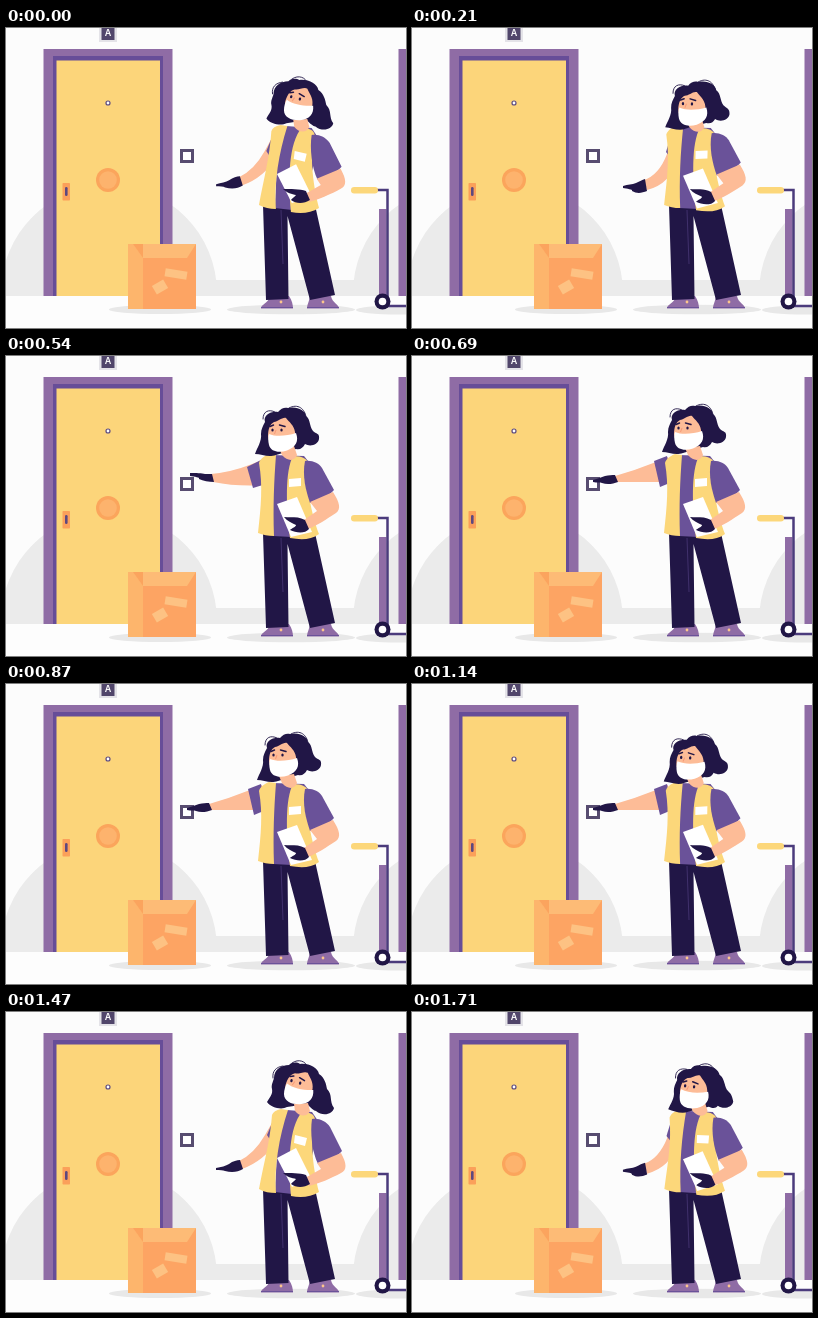
Write an HTML page that moves like this. It is 400 by 300 pixels and loops after 1740 ms.

```html
<!DOCTYPE html>
<html lang="en">
<head>
<meta charset="utf-8">
<title>Delivery at the door</title>
<style>
html, body { margin: 0; width: 100%; height: 100%; overflow: hidden; background: #fcfcfc; }
svg { display: block; width: 100vw; height: 100vh; }
.frame { fill: #8f6ca5; }
.shirt { fill: #6a5299; }
.vest { fill: #fcd77a; }
.skin { fill: #fdbc97; }
.dark { fill: #211646; }
.white { fill: #fff; }
.grey { fill: #ebebeb; }
.shade { fill: #e8e8e8; }
.line { fill: none; stroke: #211646; stroke-linecap: round; }
</style>
</head>
<body>
<svg viewBox="0 0 400 300">
  <g class="grey">
    <path d="M0 252H400V268H0Z"/>
    <circle cx="103" cy="265" r="108"/>
    <circle cx="455" cy="265" r="108"/>
  </g>
  <path d="M0 268H400V300H0Z" fill="#fdfdfd"/>

  <!-- door -->
  <path class="frame" d="M37.500 21H166.500V268H37.500Z"/>
  <path d="M47 28H157V268H47Z" fill="#674d98"/>
  <path d="M50.500 32.500H154V268H50.500Z" fill="#fcd57a"/>
  <path d="M93 0H111V14H93Z" fill="#e4e3e8"/>
  <path d="M95.500 0H108.500V12H95.500Z" fill="#51466b"/>
  <text x="102" y="8" text-anchor="middle" font-family="Inter, Arial, sans-serif" font-weight="600" font-size="9" fill="#fff">A</text>
  <circle cx="102" cy="75" r="2" fill="#fff" stroke="#5b4a80" stroke-width="1.200"/>
  <circle cx="102" cy="152" r="12" fill="#fba55c"/>
  <circle cx="102" cy="152" r="8.800" fill="#fdb36d"/>
  <rect x="56.500" y="155" width="7.500" height="17.500" rx=".8" fill="#fba05a"/>
  <rect x="59" y="159" width="2.600" height="9" rx="1.300" fill="#5d487f"/>

  <!-- bell -->
  <path d="M174 121H188V135H174Z" fill="#574c70"/>
  <path d="M177 124H185V132H177Z" fill="#fff"/>

  <!-- neighbouring door and trolley -->
  <path class="frame" d="M392.500 21H400V268H392.500Z"/>
  <ellipse class="shade" cx="392" cy="282" rx="42" ry="4.500"/>
  <path class="frame" d="M373 181H380.500V268H373Z"/>
  <path d="M370 162H381.500V278H400" fill="none" stroke="#4b3b7c" stroke-width="2.500"/>
  <rect x="345" y="159" width="27" height="6.500" rx="3.200" class="vest"/>
  <circle cx="376.500" cy="273.500" r="8" class="dark"/>
  <circle cx="376.500" cy="273.500" r="3.800" class="white"/>

  <!-- parcel -->
  <ellipse class="shade" cx="154" cy="281.500" rx="51" ry="4.500"/>
  <path d="M122 216H190V281H122Z" fill="#fda463"/>
  <path d="M122 216H137V281H122Z" fill="#fdb56c"/>
  <path d="M127 216H190L181 230H137Z" fill="#fdbb76"/>
  <path d="M127 216H137V230Z" fill="#fba45e"/>
  <rect x="159" y="242" width="22" height="8" transform="rotate(9 170 246)" fill="#fdc283"/>
  <rect x="147.500" y="254" width="13" height="10" transform="rotate(-30 154 259)" fill="#fdc283"/>

  <!-- courier -->
  <ellipse class="shade" cx="285" cy="281.500" rx="64" ry="4.800"/>
  <g class="frame">
    <path d="M264 268H283C286 272 287 277 287 280.500H255C255 276 262 276 264 268Z"/>
    <path d="M304 268H325C326 275 333 276 333 280.500H301C301 277 303 274 304 268Z"/>
  </g>
  <path d="M255 279.500H287M301 279.500H333" stroke="#6a5299"/>
  <path class="dark" d="M257 177H309L329 267L304 272L281.500 188L282.500 271L260 272Z"/>
  <path d="M275 182L277 236" fill="none" stroke="#40306c"/>
  <circle cx="275" cy="274" r="1.400" fill="#fcc58c"/>
  <circle cx="317" cy="274" r="1.400" fill="#fcc58c"/>
  <path id="arm" class="skin"/>
  <path id="cuff" class="shirt"/>
  <path id="glove" class="dark"/>
  <path id="shirt" class="shirt"/>
  <path id="vestL" class="vest"/>
  <path id="vestR" class="vest"/>
  <path id="badge" class="white"/>
  <path id="sleeve" class="shirt"/>
  <path id="board" class="white"/>
  <path id="fore" class="skin"/>
  <path id="hand" class="dark"/>
  <g id="head">
    <path id="hair" class="dark"/>
    <path id="strands" class="line" stroke-width=".9"/>
  </g>
  <path id="neck" class="skin"/>
  <g id="face">
    <path class="skin" d="M262 80C262 73 264 68 268 66C272 66 276 61 280 62C283 66 288 69 289 76C290 83 285 92 277 93C268 93 263 89 262 80Z"/>
    <path class="line" stroke-width="1.500" d="M264 70.500L267.500 69M273.500 69L279 70.500"/>
    <ellipse cx="266.500" cy="74" rx="1.200" ry="1.600" class="dark"/>
    <ellipse cx="275.500" cy="74" rx="1.200" ry="1.600" class="dark"/>
    <path d="M270 74L268.500 78" stroke="#f79a78"/>
    <path class="white" d="M263 78C270 81 281 80 290 77C293 85 290 91 281 94.500C273 97 265 96 263 89C262 85 262 81 263 78Z"/>
  </g>
</svg>
<script>
const LOOP = 1740;
const el = id => document.getElementById(id);

// Arm poses: relaxed, ready, raised, pressing
const armPoses = {
  arm: [
    'M233 149Q248 142 259 123L270 104L272 128Q258 149 236 157Z',
    'M232 152Q247 147 255 126L260 106L266 130Q259 156 235 162Z',
    'M205 118Q226 116 246 108L256 104L258 129Q232 131 207 126Z',
    'M203 120Q224 114 244 106L256 101L256 126Q228 126 205 126Z'],
  cuff: [
    'M261 123L270 102L276 120L268 134Z',
    'M254 124L260 104L268 122L262 134Z',
    'M241 111L255 104L260 128L247 132Z',
    'M242 105L255 100L260 126L248 131Z'],
  glove: [
    'M210 156C215 155 220 154 223 152C227 149 231 148 234 148L237 157C232 160 226 161 219 159C217 158 214 158 210 158Z',
    'M211 158C216 156 220 157 224 155C228 153 230 152 233 151L235 163C230 165 225 166 220 163C221 161 215 161 211 160Z',
    'M184 117C190 117 196 117 199 118C202 118 204 118 206 118L208 126C203 126 197 125 193 123C194 121 189 121 184 120Z',
    'M181 124C186 123 189 121 193 120C197 119 200 119 203 119L206 126C201 128 195 129 190 127C188 126 185 127 181 126Z']
};

// Upper body: upright, leaning back
const bodyPoses = {
  shirt: [
    'M266 99L298 100L306 110L300 150L286 181L267 180L265 120Z',
    'M281 98L306 100L314 112L304 152L286 182L269 180L272 122Z'],
  vestL: [
    'M263 98C258 100 254 103 253 107C257 130 255 150 252 177C257 179 262 180 268 180C267 150 268 125 270 99Z',
    'M275 97C270 98 267 100 266 103C264 130 258 150 253 177C258 180 264 181 270 181C268 155 273 125 282 98Z'],
  vestR: [
    'M287 100C297 100 301 103 303 108C298 124 306 160 313 178C305 184 295 184 284 182C280 150 279 115 287 100Z',
    'M296 100C304 100 308 102 309 107C303 130 308 160 313 180C305 185 295 186 285 184C282 150 283 115 296 100Z'],
  badge: [
    'M283 123L295 122L295 130L283 131Z',
    'M289 123L301 126L299 134L288 131Z'],
  sleeve: [
    'M299 105C306 104 313 107 316 112L328 134C322 141 312 145 304 147C300 135 296 120 299 105Z',
    'M306 107C313 106 320 109 324 115L336 139C330 146 320 149 312 152C306 140 304 120 306 107Z'],
  board: [
    'M271 148L291 141L306 176L285 181Z',
    'M271 146L290 136L305 166L286 175Z'],
  fore: [
    'M304 146L327 136C334 147 335 153 330 157C321 163 310 170 302 173L298 164L311 155Z',
    'M311 151L335 141C341 152 341 158 335 161C326 166 312 172 303 174L299 166L315 157Z'],
  hand: [
    'M278 161C284 162 292 160 299 164L303 173C299 178 290 177 284 174C286 172 290 171 290 169C286 167 281 165 278 161Z',
    'M277 161C284 161 294 161 300 163L304 172C298 176 290 176 285 172C286 170 289 169 290 167C286 166 281 165 277 161Z'],
  neck: [
    'M273 92L288 90L291 99C289 105 282 106 276 99Z',
    'M288 92L302 91L304 99C301 105 294 105 289 99Z'],
  hair: [
    'M259 66C257 60 264 55 272 56C275 52 279 51 282 52C291 50 299 54 300 60C305 64 303 70 307 75C310 78 314 77 313 83C312 89 304 91 299 88C297 92 294 94 290 93L270 99C262 102 256 98 249 98C251 92 256 85 255 78C255 73 257 70 259 66Z',
    'M268 66C268 58 275 53 283 53C286 50 291 50 294 52C303 51 312 56 313 62C319 66 320 72 321 77C327 83 323 89 328 96C327 102 317 105 310 99C308 99 305 96 301 92L281 95C276 98 265 96 261 90C264 85 267 82 266 77C265 73 267 70 268 66Z'],
  strands: [
    'M257 63C257 55 263 53 269 56M283 52C292 47 299 53 300 61',
    'M267 66C266 59 270 55 277 54M286 51C293 46 300 50 301 54']
};

// time, arm pose, lean, face x y angle, head dx dy
const track = [
  [0, 0.1, 0.95, 292, 84, 15, 0, 0],
  [210, 1, 0.1, 281, 89, 2, 3, 2],
  [540, 2, 0, 277, 87, 0, 0, 0],
  [690, 3, 0, 277, 85, 0, 1, -2],
  [870, 3, 0, 278, 84, 0, 2, -2],
  [1140, 3, 0.06, 279, 87, 3, 2, 0],
  [1440, 0, 1, 292, 84, 16, 0, 0],
  [1490, 0, 1, 292, 84, 16, 0, 0],
  [1710, 0.93, 0.35, 282, 88, 7, 3, 2],
  [1740, 1, 0.25, 281, 89, 5, 3, 2]
];

const lerp = (a, b, k) => a + (b - a) * k;
const number = /\d+(\.\d+)?/g;

function morph(a, b, k) {
  const ends = b.match(number);
  let i = 0;
  return a.replace(number, n => lerp(+n, +ends[i++], k).toFixed(2));
}

function sample(t) {
  const i = track.findIndex(row => row[0] > t);
  const a = track[i - 1], b = track[i];
  const u = (t - a[0]) / (b[0] - a[0]);
  const k = u * u * (3 - 2 * u);
  return a.slice(1).map((v, j) => lerp(v, b[j + 1], k));
}

function pose(set, at) {
  for (const id in set) {
    const i = Math.min(Math.floor(at), set[id].length - 2);
    el(id).setAttribute('d', morph(set[id][i], set[id][i + 1], at - i));
  }
}

function draw(t) {
  const [arm, lean, fx, fy, turn, hx, hy] = sample(t);
  pose(armPoses, arm);
  pose(bodyPoses, lean);
  el('face').setAttribute('transform', `translate(${fx} ${fy}) rotate(${turn}) translate(-277 -87)`);
  el('head').setAttribute('transform', `translate(${hx} ${hy})`);
}

const start = performance.now();
function tick() {
  draw((performance.now() - start) % LOOP);
  requestAnimationFrame(tick);
}
draw(0);
requestAnimationFrame(tick);
</script>
</body>
</html>
```
